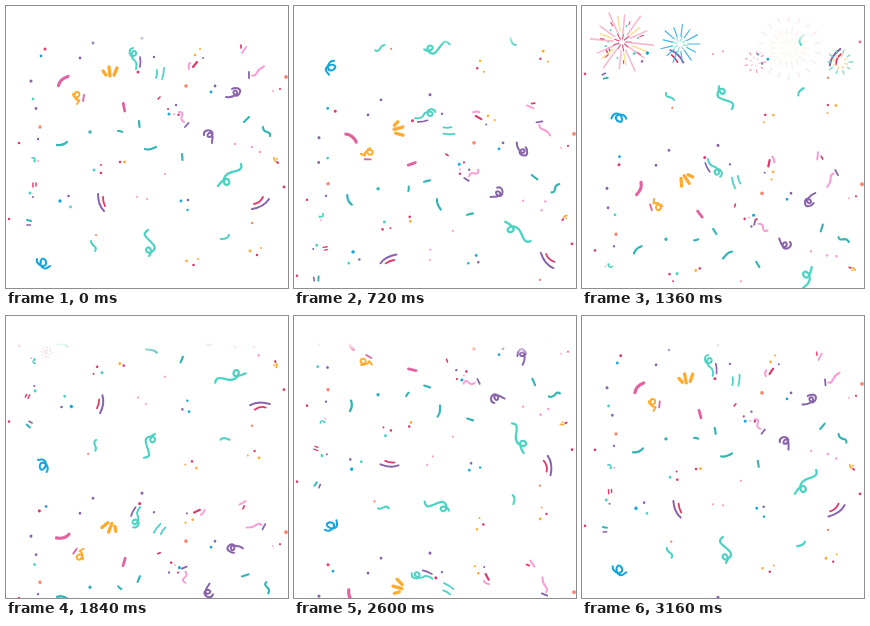
These frames come from a looping animation (282 px wide and 282 px high, 3.2 s). An HTML page with a canvas:

```html
<!DOCTYPE html>
<html>
<head>
<meta charset="utf-8">
<style>
html, body { margin: 0; width: 100%; height: 100%; overflow: hidden; background: #fff; }
canvas { display: block; width: 100vmin; height: 100vmin; }
</style>
</head>
<body>
<canvas></canvas>
<script>
const SIZE = 282, LOOP = 3200, FALL = 252.5, STEP = 40, BURST = 800;
const canvas = document.querySelector('canvas'), ctx = canvas.getContext('2d');
const ratio = devicePixelRatio || 1;
canvas.width = canvas.height = SIZE * ratio;

const teal = '#36b5b6', mint = '#4dd3c3', purple = '#8963ab', orange = '#ffab2e', red = '#e0396c',
  pink = '#fb9cd6', rose = '#e163a0', blue = '#17a7dc', salmon = '#fa8672';

// A piece is a group of strokes that turns about its own centre while it falls.
const pieces = [];
const piece = (x, y, ...marks) => pieces.push({ x, y, marks });
const line = (color, width, d) => ({ color, width, path: new Path2D(d) });
const dot = (color, x, y, r = 1.3) => line(color, r * 2, `M${x} ${y}h.01`);
const single = (color, x, y, r) => piece(x, y, dot(color, 0, 0, r));

// Curls
piece(37, 257, line(blue, 2.1, 'M-6 -4C-7 -1 -4 3 0 3S4 -2 1 -4S-4 1 -1 4S4 5 7 3'));
piece(143, 237, line(mint, 2.2, 'M-1 -13C-7 -9 -4 -7 0 -3S8 4 4 8S-5 8 -2 5S4 9 0 13'));
piece(224, 169, line(mint, 2.3, 'M11 -11C13 -5 7 -4 2 -3S-7 2 -6 7S0 10 -1 6S-7 4 -12 11'));
piece(130, 54, line(mint, 2, 'M-3 -12C-8 -11 -7 -4 -3 -4S1 -9 -2 -9S-5 -2 -2 0S1 5 0 9'),
  line(purple, 1.7, 'M4 -3Q5 2 4 7'), dot(red, 2, 12, 1.5));
piece(228, 87, line(purple, 2, 'M-8 4C-3 5 4 2 3 -1S-2 -2 0 1S5 3 6 -1S1 -6 -2 -4'));
piece(203, 130, line(purple, 2, 'M-5 -1C-6 -5 -1 -7 2 -5S3 1 0 1S-1 -4 2 -3S3 3 3 7'));
piece(73, 92, line(orange, 2, 'M-6 -4C-6 -1 -3 0 -1 -1S1 -6 -2 -6S-5 -1 -3 1S1 1 0 3T-2 6'),
  line(rose, 1.8, 'M5 -3L4 3'));

// Ribbons and arcs
piece(104, 66, line(orange, 3.3, 'M-7 -1L-4 3M-1 -5L0 4M7 -4L4 3'));
piece(57, 75, line(rose, 3.2, 'M5 -4.5Q-3 -2 -4.5 4.5'));
piece(118, 101, line(rose, 2.8, 'M-.7 -3.5L.7 4'));
piece(154, 68, line(mint, 1.8, 'M-3 -4Q-2.5 0 -4 4M4 -6Q4 0 2 5'));
piece(250, 65.5, line(pink, 2, 'M8 -5Q3 -3 1 1T-4 4'), line(purple, 1.8, 'M-7 .5V6.5'));
piece(237, 43, line(pink, 1.9, 'M3 -2L-1 4'), line(red, 1.7, 'M-2 -4V-1'));
piece(189, 54, line(red, 2.2, 'M2 2L-2 7'), line(pink, 2, 'M-5 3Q-7 5 -6 9'),
  dot(orange, 0, -5), dot(orange, 5, -11, 1.1), dot(purple, 8, -2, 1));
piece(254, 197, line(purple, 2, 'M-8 6Q4 4 9 -4'), line(red, 1.8, 'M-6 1Q0 0 3 -6'));
piece(95, 196, line(purple, 2, 'M-3 -8Q-3 3 3 9'), line(red, 1.8, 'M2 -5Q2 0 4 4'));
piece(261, 126, line(teal, 2.2, 'M-4 -5Q-4 -1 0 0T3 4'));
piece(240, 114, line(teal, 2.1, 'M3 -3L-2 2'));
piece(219, 231, line(mint, 2.1, 'M-4 2Q3 2 4 -2'));
piece(88, 238, line(mint, 2, 'M-3 -3Q-3 0 0 2T1 7'), dot(salmon, 2, -9, 1.1));
piece(56, 137, line(teal, 2.3, 'M-5 2Q1 3 5 -1'));
piece(145, 142, line(teal, 2.2, 'M-6 1Q-3 2 0 1T5 -1'));
piece(176, 151, line(teal, 2.2, 'M0 -3L.5 3'));
piece(133, 118, line(teal, 2.2, 'M0 -3L.5 3'));
piece(114, 126, line(teal, 2.2, 'M-2 -1Q1 -1 2 0'));
piece(178, 113, line(pink, 2, 'M-5 -7Q0 -7 -2 -3T0 3'), line(purple, 1.8, 'M4.5 4L1 8'));

// Clusters
piece(168, 106, dot(blue, -5, 2, 1.5), dot(red, -6, -3, 1.1), dot(red, 4.6, 2.8),
  dot(purple, 2, -7, 1.2), dot(pink, 0, 2, .9));
piece(37, 47, dot(red, 2, -4, 1.5), dot(blue, -2, 3, 1.4));
piece(29, 98, dot(mint, -2, -5, 1.4), dot(purple, 1, 4.5, 1.4));
piece(28, 153, line(mint, 1.6, 'M-2 -1Q1 -2 1 1T0 2'), dot(pink, 4, 2, .9));
piece(26, 184, line(red, 1.4, 'M1 -7V-3M4 -7V-4'), dot(mint, -2, 3, 1.5), dot(purple, 1, 7, 1));
piece(23, 216, line(teal, 2, 'M-2 -2L2 -1'), line(purple, 1.6, 'M-2 3H1.5'));
piece(116, 156, dot(red, -2, 0), dot(orange, 2.5, 0, 1.4));
piece(92, 163, dot(mint, -4, 1, 1.5), dot(red, 3, -4, 1), dot(red, 3, 4));
piece(60, 195, dot(blue, -6, 0, 1.7), dot(purple, 2.5, -5), dot(mint, 4.5, 6, 1.4));
piece(180, 198, dot(blue, -5, -3, 1.4), dot(purple, 2, -4), dot(blue, 1.5, 6, 1.2));
piece(136, 192, dot(pink, -5, -1, 1.1), dot(pink, 5, 1, 1.1));
piece(186, 256, dot(orange, -5.5, -1, 1.3), dot(red, 1.5, 3), dot(orange, 6, -3, 1));
piece(249, 246, dot(orange, -5, -1, 1.4), dot(red, 2, 3, 1.2), dot(orange, 6, -4, 1));
piece(250, 143, dot(pink, -4, -2), dot(pink, 4, 3));
piece(270, 155, line(orange, 1.9, 'M-2 -3L-1 0'), line(red, 1.9, 'M1 1L2 2'), dot(orange, 1, -2, .9));

// Loose dots
single(purple, 87, 37, 1.4);
single(purple, 74, 52, 1.4);
single(purple, 136, 32, 1.5);
single(purple, 148, 51, 1.2);
piece(153, 92, line(red, 1.6, 'M1 -1L-1 1'));
single(salmon, 180, 80, 1.8);
single(blue, 205, 86, 1.4);
single(purple, 209, 80, 1.4);
single(salmon, 280, 71, 1.9);
single(red, 274, 83, 1.1);
single(pink, 267, 85, .9);
single(purple, 25, 75, 1.5);
single(salmon, 34, 121, 1.7);
single(purple, 32, 133, 1.2);
single(red, 13, 137, 1.3);
single(red, 3, 213, 1.3);
single(teal, 84, 126, 1.7);
single(salmon, 246, 217, 1.2);
single(red, 278, 181, 1.4);
single(pink, 229, 138, 1.2);
single(pink, 159, 168, 1.1);

function drawPieces(progress) {
  for (const { x, y, marks } of pieces) {
    const top = (y + FALL * progress) % FALL;
    for (const py of [top, top + FALL]) {
      if (py > SIZE + 16) continue;
      ctx.save();
      ctx.translate(x, py);
      ctx.rotate(progress * 2 * Math.PI);
      for (const { color, width, path } of marks) {
        ctx.strokeStyle = color;
        ctx.lineWidth = width;
        ctx.stroke(path);
      }
      ctx.restore();
    }
  }
  const veil = ctx.createLinearGradient(0, 27, 0, 39);
  veil.addColorStop(0, '#fff');
  veil.addColorStop(1, 'rgba(255,255,255,0)');
  ctx.fillStyle = veil;
  ctx.fillRect(0, 0, SIZE, 39);
}

// Each ring: colour, ray count, inner and outer share of the radius, width, turn
const fireworks = [
  { x: 40, y: 36, r: 33, start: 200, alpha: 1, rings: [
    ['#f8b9d0', 12, .28, .98, 1.6, .1], ['#fbdf94', 6, .35, .8, 1.5, .36],
    ['#e8557f', 9, .1, .28, 1.2, 0], ['#e8557f', 7, .58, .7, 1.2, .6],
    ['#5fcfc8', 6, .5, .53, 1.7, .8]] },
  { x: 98, y: 38, r: 21, start: 270, alpha: 1, rings: [
    ['#45b4e6', 13, .38, .97, 1.2, 0], ['#7fdccf', 8, .15, .4, 1, .24]] },
  { x: 207, y: 42, r: 34, start: 250, alpha: .5, rings: [
    ['#fbe0cb', 18, .42, .62, 1.2, 0], ['#f9ccd6', 18, .8, .97, 1.2, .17],
    ['#fdeccb', 10, .15, .32, 1.1, 0]] },
  { x: 258, y: 56, r: 14, start: 300, alpha: .9, rings: [
    ['#6fd4c9', 10, .68, .95, 1.3, 0], ['#fbd480', 8, .35, .6, 1.2, .3]] },
  { x: 173, y: 56, r: 12, start: 310, alpha: .9, rings: [
    ['#f08fb2', 9, .72, .92, 1.2, 0], ['#f9c0d2', 6, .3, .45, 1.1, .3]] }
];

function drawFireworks(phase) {
  if (phase > 650) return;
  for (const { x, y, r, start, alpha, rings } of fireworks) {
    const p = (phase - start) / (660 - start);
    if (p <= 0) continue;
    const radius = r * (1 - (1 - p) ** 2.5);
    const growth = Math.min(1, p * 2);
    ctx.globalAlpha = alpha * Math.min(1, p * 5);
    for (const [color, count, inner, outer, width, turn] of rings) {
      ctx.beginPath();
      for (let i = 0; i < count; i++) {
        const a = turn + i * 2 * Math.PI / count, far = outer - (i % 2) * (outer - inner) * .2;
        const near = far - (far - inner) * growth;
        const c = Math.cos(a) * radius, s = Math.sin(a) * radius;
        ctx.moveTo(x + c * near, y + s * near);
        ctx.lineTo(x + c * far, y + s * far);
      }
      ctx.strokeStyle = color;
      ctx.lineWidth = width * (.5 + growth / 2);
      ctx.stroke();
    }
  }
  ctx.globalAlpha = 1;
}

const begin = performance.now();
function draw() {
  const time = Math.floor((performance.now() - begin) % LOOP / STEP) * STEP;
  ctx.setTransform(ratio, 0, 0, ratio, 0, 0);
  ctx.fillStyle = '#fff';
  ctx.fillRect(0, 0, SIZE, SIZE);
  ctx.lineCap = ctx.lineJoin = 'round';
  drawPieces(time / LOOP);
  drawFireworks(time % BURST);
  requestAnimationFrame(draw);
}
draw();
</script>
</body>
</html>
```
